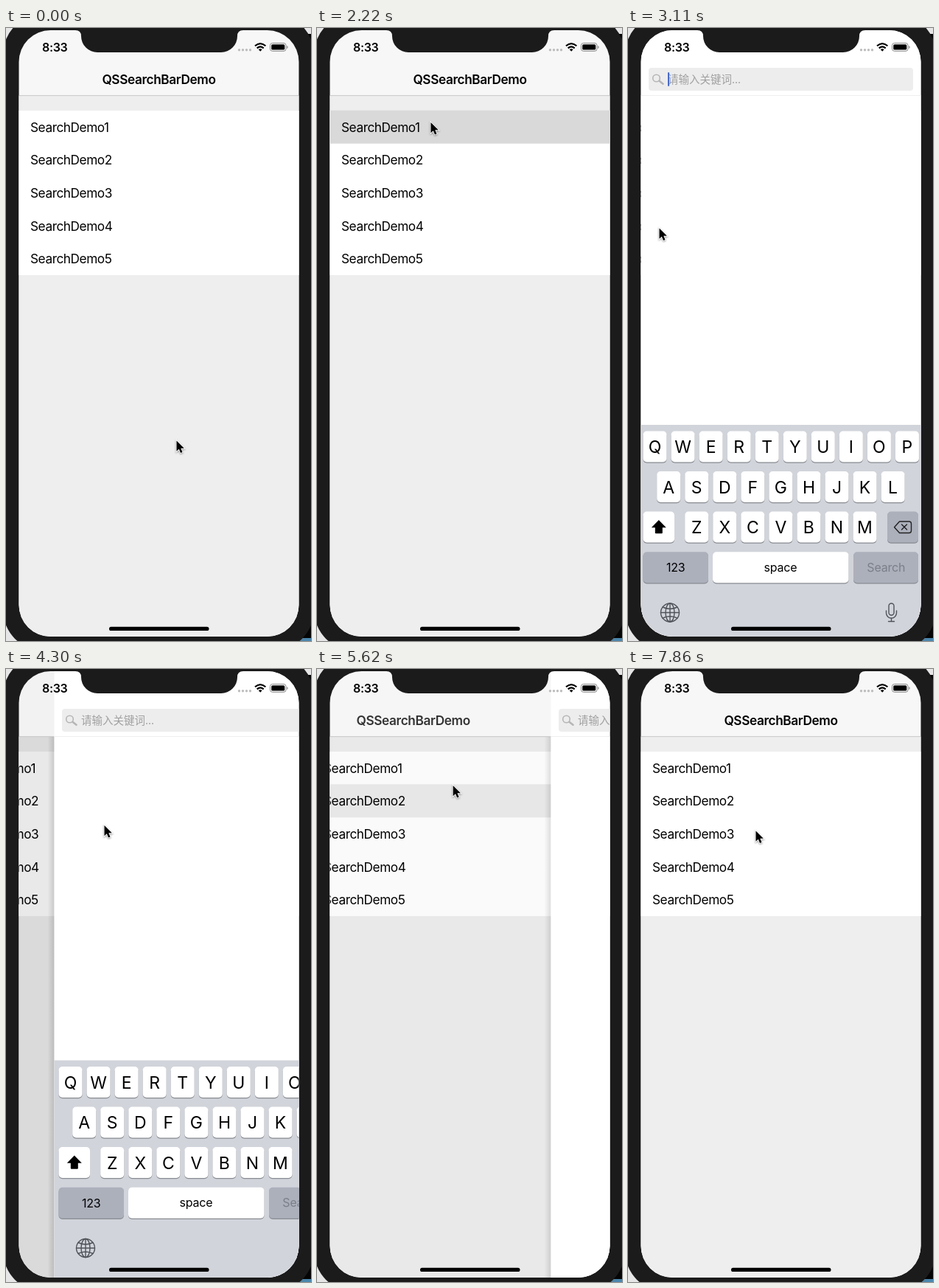
Animation of 414x831 px, one loop 8 s. Source, as an HTML page:

```html
<!DOCTYPE html>
<html lang="en">
<head>
<meta charset="utf-8">
<title>Search bar demo</title>
<style>
  html, body { margin: 0; width: 100%; height: 100%; overflow: hidden; background: #e6e6e6; }
  svg { display: block; width: 414px; height: 831px; }
  text { font-family: Inter, "Noto Sans CJK SC", "Noto Sans CJK", sans-serif; white-space: pre; }
  .row { font-size: 17.25px; letter-spacing: -.45px; }
  .title { font-size: 17.25px; font-weight: 600; letter-spacing: -.4px; }
  .clock { font-size: 16px; font-weight: 600; letter-spacing: -.3px; }
  .cjk { font-family: "Noto Sans CJK SC", "Noto Sans CJK", sans-serif; }
  .mid { text-anchor: middle; }
  .letter { font-size: 23px; }
  .label { font-size: 16px; letter-spacing: -.2px; }
  .icon { fill: none; stroke: #505359; stroke-width: 1.4; stroke-linecap: round; stroke-linejoin: round; }
</style>
</head>
<body>
<svg id="stage" viewBox="0 0 414 831"></svg>
<script>
const WIDTH = 380, LOOP = 8000, TICKS = 54;

const rect = (x, y, w, h, fill, r = 0, extra = '') =>
  `<rect x="${x}" y="${y}" width="${w}" height="${h}" rx="${r}" fill="${fill}" ${extra}/>`;
const text = (x, y, cls, str, fill = '#000') =>
  `<text x="${x}" y="${y}" class="${cls}" fill="${fill}">${str}</text>`;

const GREY = '#acb0bb';
const keyCap = (x, y, w, fill = '#fff') =>
  rect(x, y + 1.2, w, 42, '#888b91', 5) + rect(x, y, w, 42, fill, 5);
const letterRow = (letters, x, y) => [...letters].map((ch, i) => {
  const left = x + i * 38.05;
  return keyCap(left, y, 32) + text(left + 16, y + 29.5, 'letter mid', ch);
}).join('');

const keyboard = `
  ${rect(14.5, 530.5, 390, 310, '#d1d4da')}
  ${letterRow('QWERTYUIOP', 20.5, 539)}
  ${letterRow('ASDFGHJKL', 39.2, 593.5)}
  ${keyCap(20.5, 648, 42.5)}
  <path d="M41.8 659.5l10 10.2h-5v7q0 1-1 1h-8q-1 0-1-1v-7h-5z"/>
  ${letterRow('ZXCVBNM', 77.2, 648)}
  ${keyCap(352, 648, 42, GREY)}
  <path class="icon" style="stroke:#222" d="M368.5 661.5h13q3 0 3 3v9.500q0 3-3 3h-13l-7-7.700zM371.500 665.500l7 7m0-7l-7 7"/>
  ${keyCap(20.5, 702.7, 88.5, GREY)}${text(64.7, 729.7, 'label mid', '123')}
  ${keyCap(115, 702.7, 184.5)}${text(207, 729, 'label mid', 'space')}
  ${keyCap(306, 702.7, 88, GREY)}${text(350.3, 729, 'label mid', 'Search', '#7b7f88')}
  <g class="icon">
    <circle cx="57" cy="785" r="12.5"/><ellipse cx="57" cy="785" rx="6" ry="12.500"/>
    <path d="M57 772.500v25M44.500 785h25M47 777.500q10 5 20 0M47 792.500q10-5 20 0"/>
    <rect x="354" y="772.500" width="7" height="16" rx="3.500"/>
    <path d="M350.500 782.500v3a7 7 0 0 0 14 0v-3M357.500 792.500v4.500m-4 0h8"/>
  </g>`;

const listRows = [1, 2, 3, 4, 5].map((n, i) =>
  text(33, 140.8 + i * 44.6, 'row', 'SearchDemo' + n)).join('');

const statusBar = `
  ${text(49, 31.5, 'clock', '8:33')}
  ${[317, 322, 327, 332].map(x => `<circle cx="${x - .5}" cy="29.700" r="1.700" fill="#bdbdbd"/>`).join('')}
  <g fill="none" stroke="#000" stroke-width="2.200">
    <path d="M338 24.300q7.200-6.400 14.400 0M340.700 27.300q4.500-3.900 9 0"/>
  </g>
  <path d="M345.200 31.800l-2.500-2.700q2.500-1.900 5 0z"/>
  ${rect(358.5, 20.5, 21.5, 10.8, 'none', 3, 'stroke="#888"')}
  ${rect(360.2, 22.2, 18.1, 7.400, '#000', 1.6)}
  <path d="M381.300 24v4q1.400-.6 1.400-2t-1.400-2z" fill="#888"/>`;

document.getElementById('stage').innerHTML = `
  <defs>
    <clipPath id="screen">${rect(17.5, 3, WIDTH, 822, '#fff', 43)}</clipPath>
    <linearGradient id="edge"><stop stop-opacity="0"/><stop offset="1" stop-opacity=".14"/></linearGradient>
  </defs>
  ${rect(0, 0, 414, 831, '#e6e6e6')}
  ${rect(390, 8, 24, 823, '#050505')}${rect(390, 827, 24, 4, '#4a86ad')}
  ${rect(-4, -19, 422, 863, '#1b1b1b', 55)}
  <g clip-path="url(#screen)">
    ${rect(17, 3, 382, 823, '#f7f7f7')}
    <g id="list">
      ${rect(17, 92, 500, 740, '#eee')}
      ${rect(17, 112, 500, 223, '#fff')}
      ${rect(17, 111.7, 500, 45, '#d9d9d9', 0, 'id="highlight"')}
      ${listRows}
    </g>
    ${rect(17, 92, 382, 740, '#000', 0, 'id="dim"')}
    ${rect(17, 3, 382, 89, '#000', 0, 'id="navDim"')}
    ${rect(17, 91.3, 382, .8, '#bdbdbd')}
    <g id="title">${text(207.5, 75.5, 'title mid', 'QSSearchBarDemo')}</g>
    <g id="panel">
      ${rect(8.5, 92, 9, 740, 'url(#edge)', 0, 'id="shadow"')}
      ${rect(17.5, 3, 381, 823, '#fff')}
      ${rect(17.5, 91.2, 381, .8, '#ebebeb')}
      ${rect(28, 54, 359, 31, '#ededed', 4, 'id="field"')}
      <g fill="none" stroke="#b6b6b6" stroke-linecap="round">
        <circle cx="38.500" cy="68" r="4.800" stroke-width="1.600"/>
        <path d="M42.500 71.700l5 4" stroke-width="2.600"/>
      </g>
      <text x="54" y="74.500" class="cjk" font-size="14.500" fill="#a0a0a0">请输入关键词...</text>
      ${rect(54, 60, 2, 19, '#3e6be0', 1, 'id="caret"')}
      <text id="cancel" x="354.700" y="75.300" class="cjk" font-size="15.700" fill="#333">取消</text>
    </g>
    <g id="keyboard">${keyboard}</g>
    ${statusBar}
    ${rect(140, 811.8, 135.5, 5.200, '#000', 2.6)}
  </g>
  <path fill="#1b1b1b" d="M94 0V3q8 0 8 8a22 22 0 0 0 22 22H292a22 22 0 0 0 22-22q0-8 8-8V0z"/>
  <g id="pointer">
    <path d="M0 0V14.300L3.300 11.300L5.500 16.400L8 15.400L5.800 10.300H10.300z" stroke="#fff" stroke-width="1.800"
      paint-order="stroke" style="filter:drop-shadow(0 1px 1px rgba(0,0,0,.4))"/>
  </g>`;

// Tracks: [tick, value...], linear in between.
const pointerTrack = [
  [1, 231.5, 559.5], [2, 233, 562], [3, 226, 520], [6, 158, 180], [7, 142.5, 102], [8, 149, 118], [9, 154.5, 128],
  [15, 154.5, 128], [20, 45, 264], [21, 42.5, 271.5], [22, 42.5, 271.5], [27, 85, 224], [29, 133.5, 212],
  [33, 311.5, 250.5], [35, 150, 174], [37, 150, 174], [43, 358, 78], [44, 367, 72], [45, 370.5, 68],
  [49, 370.5, 68], [52, 190, 210], [53, 173.5, 219.5]
];
const push = start => [[start, 380], [start + 1, 300], [start + 2, 90], [start + 3, 18], [start + 4, 0]];
const panelTrack = [
  ...push(15), [27, 0], [28, 12], [29, 48], [31, 137], [32, 230], [33, 365.5], [34, 380],
  ...push(37), [48, 0], [49, 12], [50, 190], [51, 340], [52, 376], [53, 380]
];
const rise = start => [[start, 300], [start + 1, 90], [start + 2, 7.5], [start + 3, 0]];
const keyboardTrack = [...rise(19), [34, 0], [35, 300], ...rise(41)];

function sample(track, k) {
  const next = track.findIndex(p => p[0] > k);
  if (next < 0) return track[track.length - 1].slice(1);
  if (next === 0) return track[0].slice(1);
  const a = track[next - 1], b = track[next], f = (k - a[0]) / (b[0] - a[0]);
  return a.slice(1).map((v, i) => v + (b[i + 1] - v) * f);
}

const $ = id => document.getElementById(id);
const set = (id, name, value) => $(id).setAttribute(name, value);
const move = (id, x, y = 0) => set(id, 'transform', `translate(${x} ${y})`);
const show = (id, on) => set(id, 'visibility', on ? 'visible' : 'hidden');
const between = (k, a, b) => k >= a && k <= b;

function draw(k) {
  const [x] = sample(panelTrack, k), [lift] = sample(keyboardTrack, k);
  const covered = 1 - x / WIDTH;
  const dragging = between(k, 28, 31);
  const withCancel = k >= 37;

  move('pointer', ...sample(pointerTrack, k));
  move('panel', x);
  move('keyboard', x + (dragging ? 3 : 0), lift);
  move('list', -114 * covered);
  move('title', -365 * covered);
  set('title', 'opacity', 1 - covered);
  set('dim', 'opacity', .1 * covered);
  set('navDim', 'opacity', .022 * covered);
  set('shadow', 'opacity', Math.min(1, covered * 4));
  ['panel', 'keyboard'].forEach(id => set(id, 'display', x < WIDTH ? 'inline' : 'none'));

  const sincePress = k - (withCancel ? 37 : 15);
  set('highlight', 'opacity', between(sincePress, 0, 1) ? 1 - sincePress / 2 : 0);
  set('highlight', 'y', withCancel ? 156.3 : 111.7);
  set('field', 'width', withCancel ? 315.5 : 359);
  show('cancel', withCancel);
  show('caret', between(k, 19, 22) || between(k, 41, 44));
}

function frame(now) {
  const k = Math.floor((now % LOOP + 11) * TICKS / LOOP);
  draw(Math.min(k, TICKS - 1));
  requestAnimationFrame(frame);
}
draw(0);
requestAnimationFrame(frame);
</script>
</body>
</html>
```
